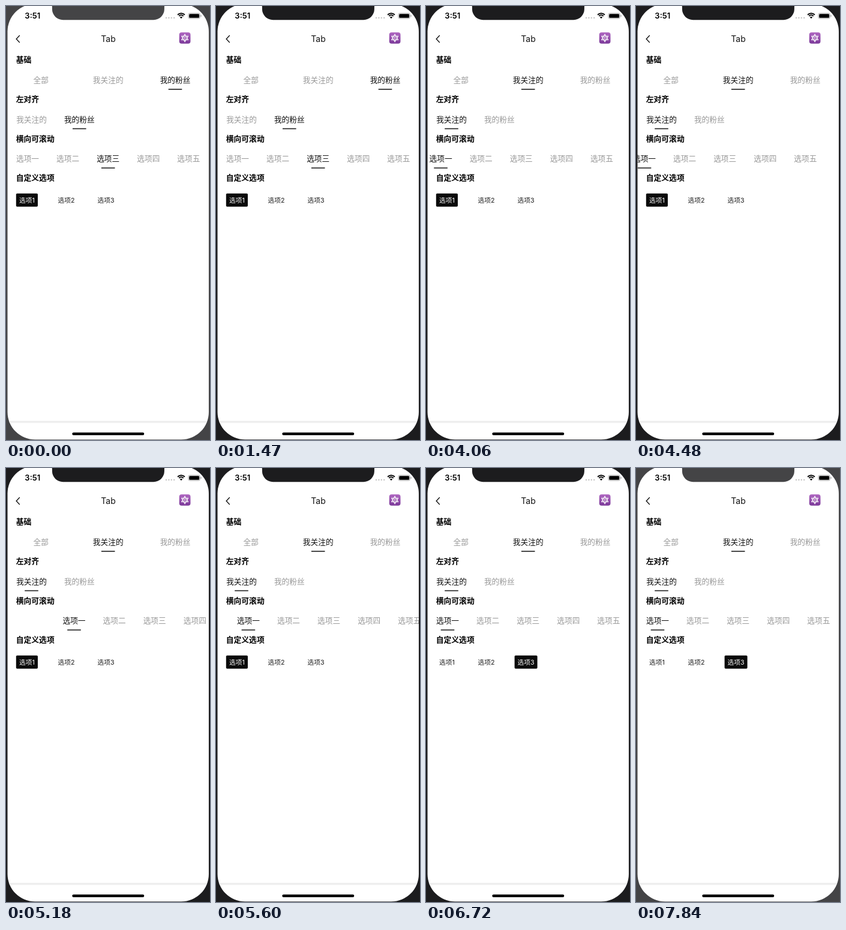
An HTML page with a canvas for the animation above (8190 ms loop, 340x724 px).

```html
<!DOCTYPE html>
<html lang="zh-CN">
<head>
<meta charset="utf-8">
<title>Tab</title>
<style>
  html, body { margin: 0; width: 100%; height: 100%; overflow: hidden; background: #fff; }
  canvas { display: block; width: 340px; height: 724px; }
</style>
</head>
<body>
<canvas id="stage"></canvas>
<script>
const W = 340, H = 724, LOOP = 8190, TICK = 70;
const INK = '#111', MUTED = '#999';
const FONT = 'Inter, "Noto Sans CJK SC", "Noto Sans CJK", sans-serif';
const CJK = '"Noto Sans CJK SC", "Noto Sans CJK", sans-serif';
const SCREEN = { x: 2.5, y: -3.5, w: 335.5, h: 726.8, r: 46 };

const canvas = document.getElementById('stage');
const ctx = canvas.getContext('2d');
const ratio = window.devicePixelRatio || 1;
canvas.width = W * ratio;
canvas.height = H * ratio;
ctx.scale(ratio, ratio);

// Value of the last [time, value] step that has been reached.
function stepAt(steps, t) {
  let value = steps[0][1];
  for (const [time, next] of steps) if (t >= time) value = next;
  return value;
}

const focusSteps = [[0, '#444446'], [1470, '#1c1c1e'], [7840, '#444446']];
const basicSteps = [[0, 2], [1540, 0], [2030, 1]];
const leftSteps = [[0, 1], [2870, 0]];
const scrollSteps = [[0, 2], [3570, 0]];
const customSteps = [[0, 0], [6300, 1], [6650, 2]];
const settleSteps = [[4340, -37], [4480, -22], [4620, -8], [4690, -4],
                     [4830, -2.5], [4900, -1], [4970, 0], [5180, 77.5]];

// Drag left, settle, drag right, then a critically damped spring back.
function scrollOffset(time) {
  const t = Math.floor(time / TICK) * TICK;
  if (t < 4060 || t >= 6020) return 0;
  if (t < 4340) return -37 * Math.sin((t - 3990) / 350 * Math.PI / 2);
  if (t < 5390) return stepAt(settleSteps, t);
  const u = (t - 5320) / 100;
  return 77.5 * (1 + u) * Math.exp(-u);
}

function text(str, x, y, size, color, { weight = 400, align = 'left', font = CJK } = {}) {
  ctx.font = `${weight} ${size}px ${font}`;
  ctx.textAlign = align;
  ctx.fillStyle = color;
  ctx.fillText(str, x, y);
}

function roundBox(x, y, w, h, r, color) {
  ctx.beginPath();
  ctx.roundRect(x, y, w, h, r);
  ctx.fillStyle = color;
  ctx.fill();
}

function dot(x, y, r, color) {
  ctx.beginPath();
  ctx.arc(x, y, r, 0, Math.PI * 2);
  ctx.fillStyle = color;
  ctx.fill();
}

function stroke(color, width) {
  ctx.strokeStyle = color;
  ctx.lineWidth = width;
  ctx.stroke();
}

function drawNotch(color) {
  const left = 76.9, right = 263.9, bottom = 23.2;
  ctx.beginPath();
  ctx.moveTo(left - 5.5, -3.5);
  ctx.quadraticCurveTo(left, -3.5, left, 2);
  ctx.arcTo(left, bottom, left + 20, bottom, 18);
  ctx.arcTo(right, bottom, right, 2, 18);
  ctx.lineTo(right, 2);
  ctx.quadraticCurveTo(right, -3.5, right + 5.5, -3.5);
  ctx.closePath();
  ctx.fillStyle = color;
  ctx.fill();
}

function drawStatusBar() {
  text('3:51', 44.3, 21.3, 13, '#000', { weight: 600, align: 'center', font: FONT });
  for (let i = 0; i < 4; i++) dot(267 + i * 4.4, 19.8, 1.2, '#c4c4c4');

  const spread = angle => [-Math.PI / 2 - angle, -Math.PI / 2 + angle];
  for (const r of [8.2, 5.1]) {
    ctx.beginPath();
    ctx.arc(292, 20.4, r, ...spread(0.8));
    stroke('#000', 2);
  }
  ctx.beginPath();
  ctx.moveTo(292, 21);
  ctx.arc(292, 21, 3.2, ...spread(0.75));
  ctx.fillStyle = '#000';
  ctx.fill();

  ctx.beginPath();
  ctx.roundRect(303.9, 12, 19.6, 9, 2.6);
  stroke('#a6a6a6', 0.9);
  roundBox(305.2, 13.3, 17, 6.4, 1.5, '#000');
  roundBox(324.5, 15, 1.2, 3.2, 0.7, '#a6a6a6');
}

function triangle(cx, cy, r, start) {
  ctx.beginPath();
  for (let i = 0; i < 3; i++) {
    const a = start + i * Math.PI * 2 / 3;
    ctx.lineTo(cx + r * Math.cos(a), cy + r * Math.sin(a));
  }
  ctx.closePath();
  stroke('#fff', 1.1);
}

function drawHeader() {
  ctx.beginPath();
  ctx.moveTo(22.8, 49);
  ctx.lineTo(17.2, 55);
  ctx.lineTo(22.8, 61);
  stroke('#111', 1.4);
  text('Tab', 170.5, 60, 14, '#111', { align: 'center', font: FONT });

  const purple = ctx.createLinearGradient(0, 44, 0, 63);
  purple.addColorStop(0, '#b068c2');
  purple.addColorStop(1, '#7a3898');
  roundBox(288.7, 44, 18.8, 18.8, 4, purple);
  triangle(298.1, 53.4, 6.2, -Math.PI / 2);
  triangle(298.1, 53.4, 6.2, Math.PI / 2);
  dot(298.1, 53.4, 1.1, '#fff');
}

// Tabs are [label, center x]; the selected one gets a short underline.
function drawTabs(tabs, y, selected, offset = 0) {
  tabs.forEach(([label, center], i) => {
    const x = center + offset;
    const active = i === selected;
    text(label, x, y + 4.8, 12.7, active ? INK : MUTED, { align: 'center' });
    if (active) {
      ctx.fillStyle = '#2b2b2b';
      ctx.fillRect(x - 11.3, y + 15.1, 22.6, 1.7);
    }
  });
}

const basicTabs = [['全部', 58.3], ['我关注的', 170.2], ['我的粉丝', 282]];
const leftTabs = [['我关注的', 42.5], ['我的粉丝', 122.3]];
const scrollTabs = [...'一二三四五'].map((n, i) => ['选项' + n, 36 + i * 67.1]);
const chips = [
  { label: '选项1', x: 16.8, w: 36.2 },
  { label: '选项2', x: 81.5, w: 38 },
  { label: '选项3', x: 147.6, w: 38 }
];

function drawChips(selected) {
  chips.forEach(({ label, x, w }, i) => {
    const active = i === selected;
    if (active) roundBox(x, 312.8, w, 22, 1.8, '#0b0b0b');
    text(label, x + w / 2, 328.1, 10.7, active ? '#fff' : '#1a1a1a', { align: 'center', font: FONT });
  });
}

function draw(t) {
  const frameColor = stepAt(focusSteps, t);
  ctx.fillStyle = frameColor;
  ctx.fillRect(0, 0, W, H);

  ctx.save();
  ctx.beginPath();
  ctx.roundRect(SCREEN.x, SCREEN.y, SCREEN.w, SCREEN.h, SCREEN.r);
  ctx.clip();
  ctx.fillStyle = '#fff';
  ctx.fillRect(0, 0, W, H);

  drawNotch(frameColor);
  drawStatusBar();
  drawHeader();

  ['基础', '左对齐', '横向可滚动', '自定义选项'].forEach((title, i) =>
    text(title, 16.7, 94.4 + i * 65.6, 12.8, '#000', { weight: 600 }));

  drawTabs(basicTabs, 123, stepAt(basicSteps, t));
  drawTabs(leftTabs, 188.7, stepAt(leftSteps, t));
  drawTabs(scrollTabs, 254.3, stepAt(scrollSteps, t), scrollOffset(t));
  drawChips(stepAt(customSteps, t));

  roundBox(0, 692, 334.5, 3.6, 1.5, '#eee');
  roundBox(110.3, 711.5, 120, 4.5, 2.25, '#000');
  ctx.restore();
}

const start = performance.now();
function frame() {
  draw((performance.now() - start) % LOOP);
  requestAnimationFrame(frame);
}
frame();
</script>
</body>
</html>
```
